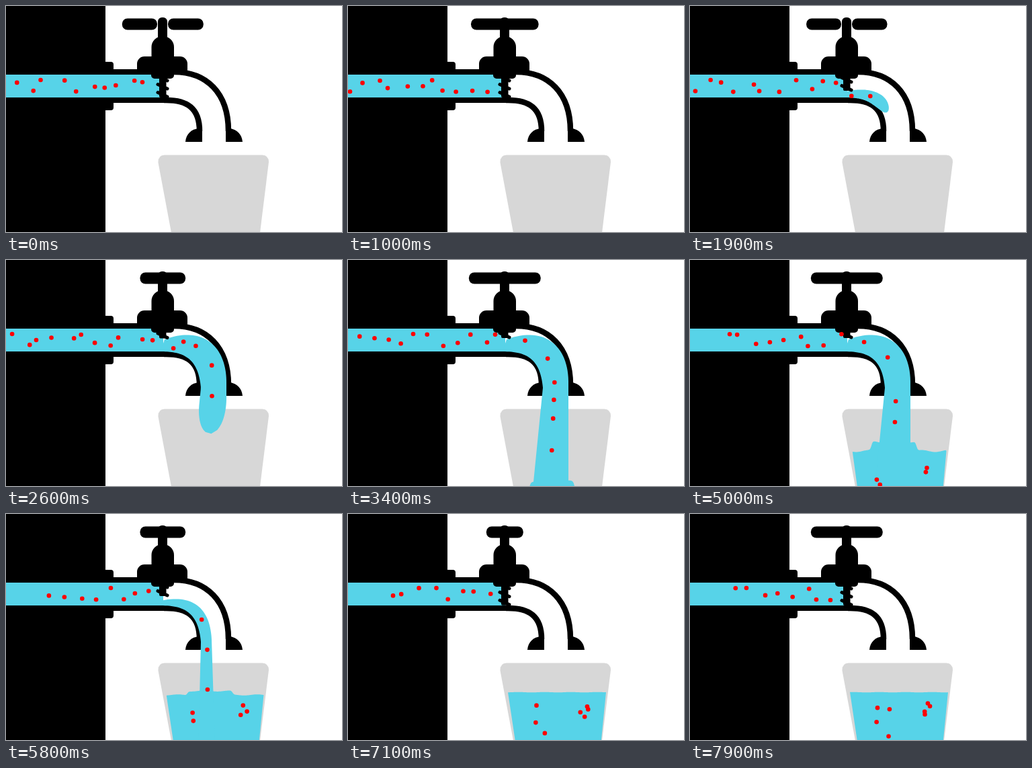
Write an HTML page with a canvas that moves like this. It is 500 by 336 pixels and loops after 8000 ms.

```html
<!DOCTYPE html>
<html lang="en">
<head>
<meta charset="utf-8">
<title>Tap filling a cup</title>
<style>
  html, body { margin: 0; width: 100%; height: 100%; overflow: hidden; background: #fff; }
  canvas { display: block; width: 500px; height: 336px; }
</style>
</head>
<body>
<canvas id="stage" width="500" height="336"></canvas>
<script>
const ctx = document.getElementById('stage').getContext('2d');
const WATER = '#57d3e8', CUP = '#d7d7d7', DOT = '#ff0000';
const STEP = 100, STEPS = 80, DOTS = 20;

const mix = (a, b, u) => a + (b - a) * u;
const mixPoint = (p, q, u) => [mix(p[0], q[0], u), mix(p[1], q[1], u)];
const clamp = u => Math.max(0, Math.min(1, u));
const smooth = u => u * u * (3 - 2 * u);

// Repeatable random number from 0 to 1 for dot i.
function random(i, salt) {
  const v = Math.sin(i * 12.9898 + salt * 78.233 + 4) * 43758.5453;
  return v - Math.floor(v);
}

// Piecewise linear value at n from [n, value] stops.
function track(n, stops) {
  const i = stops.findIndex(([end]) => n <= end);
  if (i === 0) return stops[0][1];
  if (i < 0) return stops[stops.length - 1][1];
  const [n0, v0] = stops[i - 1], [n1, v1] = stops[i];
  return mix(v0, v1, (n - n0) / (n1 - n0));
}

// Motion over the loop, in steps of 100 ms.
const handleTurn = n => track(n, [[8, 0], [26, 304], [28, 332], [53, 332], [58, 236], [71, 63], [79, -28]]);
const plugBottom = n => 138 - 20 * clamp((handleTurn(n) - 60) / 250);
const streamHead = n => Math.min(2, (n - 11.5) * 0.1);
const streamWidth = n => track(n, [[11, 0.3], [19, 0.5], [25, 1], [53, 1], [58, 0.42], [67, 0]]);
const cupLevel = n => track(n, [[32, 350], [41, 319], [50, 284], [58, 269], [64, 265]]);
const travelStops = [[11, 0], [19, 50], [26, 115], [41, 200], [52, 256]];
const travel = n => track(n, travelStops);
const timeOfTravel = d => d > 256 ? Infinity : track(d, travelStops.map(([n, v]) => [v, n]));

function cubic(a, b, c, d, u) {
  const v = 1 - u;
  return [0, 1].map(k => v * v * v * a[k] + 3 * v * v * u * b[k] + 3 * v * u * u * c[k] + u * u * u * d[k]);
}

// The two edges of the stream at u: 0 to 1 is the bend, 1 to 2 the fall.
function streamEdges(u, width) {
  const bend = Math.min(u, 1), fall = Math.max(0, u - 1);
  const low = cubic([230, 136], [265, 136], [286, 146], [290, 190], bend);
  const high = cubic([236, 118], [290, 98], [327, 125], [328, 180], bend);
  const edge = mixPoint(low, high, width);
  return [
    [low[0] + fall * mix(5, -16, width), low[1] + fall * 160],
    [edge[0] + fall * mix(9, 0, width), edge[1] + fall * 165]
  ];
}

function fill(color, draw) {
  ctx.fillStyle = color;
  ctx.beginPath();
  draw();
  ctx.fill();
}
const box = (x, y, x2, y2, r = 0) => ctx.roundRect(x, y, x2 - x, y2 - y, r);

function drawCup(n) {
  fill(CUP, () => {
    ctx.moveTo(246, 337);
    ctx.lineTo(226.5, 233);
    ctx.quadraticCurveTo(226, 222, 236, 221.5);
    ctx.lineTo(381, 221.5);
    ctx.quadraticCurveTo(391, 222, 391, 232);
    ctx.lineTo(378, 337);
  });
  const level = cupLevel(n), splash = n < 30 ? 0 : 14 * streamWidth(n);
  const left = 238 + (level - 265) * 0.2, right = 384 - (level - 265) * 0.13;
  const rough = 0.3 + splash / 12;
  fill(WATER, () => {
    ctx.moveTo(250, 345);
    for (let x = left; x < right; x++) {
      const bump = 1 / (1 + Math.exp(270 - x)) / (1 + Math.exp(x - 337));
      ctx.lineTo(x, level - splash * bump + rough * Math.sin(x * 0.16 + n));
    }
    ctx.lineTo(right, level);
    ctx.lineTo(376, 345);
  });
}

function drawStream(n) {
  const head = streamHead(n), width = streamWidth(n);
  if (head <= 0 || width <= 0) return;
  const low = [], high = [], taper = 0.3;
  for (let k = 0; k <= 60; k++) {
    const u = head * k / 60;
    const [a, b] = streamEdges(u, width);
    // Round off the leading tip until it has left the stage.
    const t = head < 2 ? clamp((u - head + taper) / taper) : 0;
    const pinch = (1 - Math.sqrt(1 - t * t)) / 2;
    low.push(mixPoint(a, b, pinch));
    high.push(mixPoint(b, a, pinch));
  }
  fill(WATER, () => [...high, ...low.reverse()].forEach(p => ctx.lineTo(...p)));
}

function drawPipe() {
  fill('#000', () => {
    box(0, 0, 148, 102);
    box(0, 136, 148, 336);
    box(140, 83, 160, 102, [0, 4, 0, 0]);
    box(140, 136, 160, 155, [0, 0, 4, 0]);
    box(148, 94, 250, 102);
    box(148, 136, 238, 144);
  });
  ctx.strokeStyle = '#000';
  ctx.lineCap = 'butt';
  ctx.lineWidth = 8.5;
  ctx.beginPath();
  ctx.moveTo(245, 98);
  ctx.bezierCurveTo(300, 96, 331, 131, 331, 186);
  ctx.moveTo(235, 140);
  ctx.bezierCurveTo(271, 139, 288, 153, 288, 186);
  ctx.stroke();
  fill('#000', () => {
    ctx.moveTo(267, 202);
    ctx.bezierCurveTo(268, 190, 276, 183, 287, 182);
    ctx.lineTo(292, 182);
    ctx.lineTo(292, 202);
    ctx.moveTo(327, 202);
    ctx.lineTo(327, 182);
    ctx.lineTo(334, 182);
    ctx.bezierCurveTo(343, 184, 351, 190, 352, 202);
  });
}

function drawPlug(n) {
  const bottom = plugBottom(n);
  fill('#000', () => box(228, 98, 238.5, bottom - 2, 2));
  ctx.lineWidth = 5;
  ctx.lineCap = 'round';
  ctx.beginPath();
  for (let y = bottom - 4.5; y > 104; y -= 12) {
    ctx.moveTo(226, y - 5);
    ctx.lineTo(240, y + 1.5);
  }
  ctx.stroke();
}

function drawValve(n) {
  const c = Math.abs(Math.cos(handleTurn(n) * Math.PI / 180));
  const half = Math.max(9, 60.5 * c), mid = 233.3;
  fill('#000', () => {
    box(195, 75, 270, 98, [11, 11, 3, 3]);
    box(216, 90, 250, 108, [0, 0, 5, 5]);
    box(216.5, 45, 250, 85, [16, 16, 0, 0]);
    box(226, 17, 240, 55, [6, 6, 0, 0]);
  });
  fill('#000', () => {
    if (c > 0.97) {
      box(mid - half, 18.5, 225, 35.5, 8);
      box(241, 18.5, mid + half, 35.5, 8);
    } else {
      box(mid - half, 18.5, mid + half, 35.5, 8);
    }
  });
}

// Dots drift along the pipe, drop with the stream, then spread out in the cup.
function dotAt(i, n) {
  const begin = 208 - 21 * i + 12 * (random(i, 1) - 0.5);
  const since = n - timeOfTravel(230 - begin);
  const sway = mix(1, 0.4, clamp(since / 4));
  const dx = 4 * sway * Math.sin(n * 0.25 + 6.3 * random(i, 2));
  const dy = 9 * sway * Math.sin(n * 0.2 + 6.3 * random(i, 3));
  if (since < 0) return [Math.min(222, begin + travel(n)) + dx, 119 + dy];

  const dist = 6 * since + 0.35 * since * since;
  const u = dist < 90 ? dist / 90 : 1 + (dist - 90) / 165;
  const [low, high] = streamEdges(u, streamWidth(n));
  const home = [mix(262, 366, random(i, 4)), cupLevel(n) + mix(14, 90, random(i, 5))];
  const [x, y] = mixPoint(mixPoint(low, high, 0.5), home, smooth(clamp((since - 15) / 14)));
  return [x + dx, y + dy];
}

function drawDots(n) {
  for (let i = 0; i < DOTS; i++) {
    const [x, y] = dotAt(i, n);
    fill(DOT, () => ctx.arc(x, y, 3.3, 0, 7));
  }
}

function draw(now) {
  const n = Math.floor(now / STEP) % STEPS;
  fill('#fff', () => box(0, 0, 500, 336));
  drawCup(n);
  fill(WATER, () => box(0, 102, 234, 136));
  drawPipe();
  drawStream(n);
  drawPlug(n);
  drawValve(n);
  drawDots(n);
  requestAnimationFrame(() => draw(performance.now() - begin));
}

const begin = performance.now();
draw(0);
</script>
</body>
</html>
```
